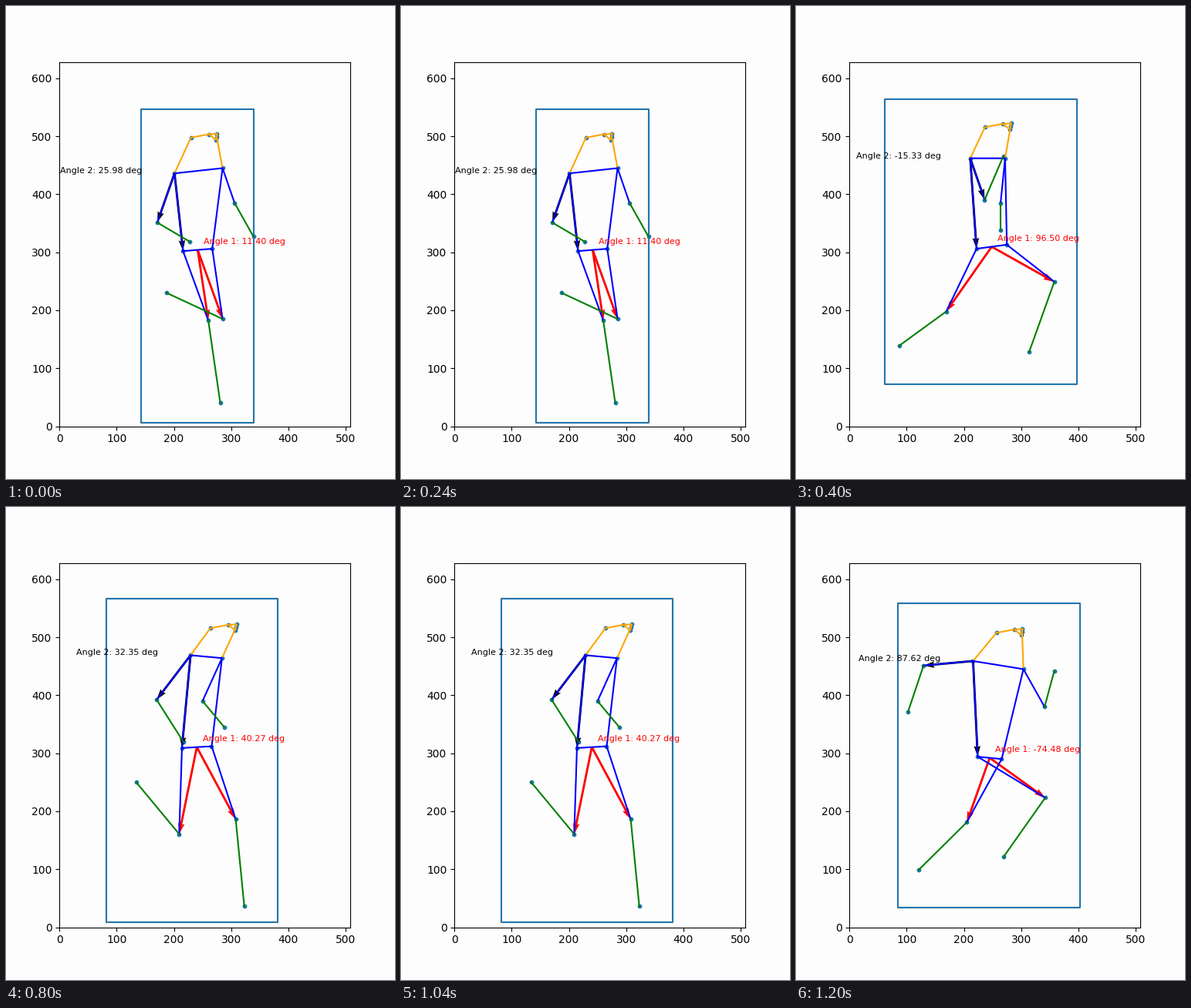
A matplotlib script that plays this animation: 504x614 px, repeating every 1600 ms.

```python
import matplotlib.pyplot as plt
import numpy as np
from matplotlib.animation import FuncAnimation

W, H, DPI = 504, 614, 100
LEFT, TOP, AX_W, AX_H = 69.4, 72.7, 377, 472.8
PAPER = "#fdfdfd"

# Key points per pose. The right elbow and right knee follow from the two
# labelled angles, the face from the nose.
POSES = [
    dict(leg_angle=11.40, thigh=123, arm_angle=25.98, arm=90, nose=(273, 494),
         left_arm=[(285, 445), (306, 385), (339, 327)],
         left_leg=[(267, 306), (285, 185), (187, 230)],
         shoulder=(201, 436), wrist=(228, 318), hip=(216, 302), ankle=(281, 40),
         box=(142, 340, 6, 547)),
    dict(leg_angle=96.50, thigh=137, arm_angle=-15.33, arm=76, nose=(280, 512),
         left_arm=[(272, 462), (264, 384), (264, 338)],
         left_leg=[(275, 313), (358, 249), (314, 128)],
         shoulder=(211, 462), wrist=(269, 466), hip=(222, 306), ankle=(87, 139),
         box=(61, 398, 72, 564)),
    dict(leg_angle=40.27, thigh=153, arm_angle=32.35, arm=97, nose=(307, 512),
         left_arm=[(284, 464), (250, 390), (288, 345)],
         left_leg=[(266, 312), (308, 186), (323, 36)],
         shoulder=(229, 469), wrist=(217, 319), hip=(214, 309), ankle=(134, 250),
         box=(82, 382, 8, 567)),
    dict(leg_angle=-74.48, thigh=119, arm_angle=87.62, arm=87, nose=(300, 504),
         left_arm=[(304, 445), (341, 380), (358, 442)],
         left_leg=[(266, 290), (205, 181), (121, 99)],
         shoulder=(216, 459), wrist=(102, 371), hip=(224, 294), ankle=(269, 121),
         box=(84, 403, 34, 559)),
]


def tilt(start, end):
    """Angle of a bone away from straight down, in degrees."""
    dx, dy = np.subtract(end, start)
    return np.degrees(np.arctan2(dx, -dy))


def reach(start, angle, length):
    a = np.radians(angle)
    return np.add(start, (length * np.sin(a), -length * np.cos(a)))


def draw_chain(ax, points, color):
    ax.plot(*np.transpose(points), color=color, lw=1.5)


def draw_arrows(ax, start, ends):
    step = np.subtract(ends, start)
    base = np.repeat([start], len(ends), axis=0)
    return ax.quiver(*base.T, *step.T, angles="xy", scale_units="xy",
                     scale=1, width=0.0075)


def draw_box(ax, x0, x1, y0, y1):
    corners = [(x0, y0), (x1, y0), (x1, y1), (x0, y1), (x0, y0)]
    ax.plot(*np.transpose(corners), color="C1", lw=1.5, solid_joinstyle="miter")
    for edge in zip(corners, corners[1:]):
        ax.plot(*np.transpose(edge), color="C0", lw=1.5, solid_capstyle="butt")


def draw(i):
    p = POSES[i]
    ax.clear()
    ax.set(xlim=(0, 508.8), ylim=(0, 628),
           xticks=range(0, 501, 100), yticks=range(0, 601, 100))

    shoulder, hip = p["shoulder"], p["hip"]
    l_shoulder, l_elbow, l_wrist = p["left_arm"]
    l_hip, l_knee, l_ankle = p["left_leg"]
    pelvis = np.add(hip, l_hip) / 2
    knee = reach(pelvis, tilt(pelvis, l_knee) - p["leg_angle"], p["thigh"])
    elbow = reach(shoulder, tilt(shoulder, hip) - p["arm_angle"], p["arm"])

    nose = np.array(p["nose"])
    l_eye, eye = nose + (2.4, 10.3), nose + (-12.1, 9.4)
    l_ear, ear = nose + (1.7, 5.4), nose + (-43.3, 3.6)

    draw_box(ax, *p["box"])
    joints = [nose, l_eye, eye, l_ear, ear, shoulder, elbow, p["wrist"],
              hip, knee, p["ankle"], *p["left_arm"], *p["left_leg"]]
    ax.scatter(*np.transpose(joints), s=10, color="C0")

    draw_chain(ax, [shoulder, ear, eye, l_eye, l_ear, l_shoulder], "orange")
    draw_chain(ax, [eye, nose, l_eye], "orange")
    draw_chain(ax, [elbow, shoulder, l_shoulder, l_elbow], "blue")
    draw_chain(ax, [shoulder, hip, l_hip, l_shoulder], "blue")
    for bone in ([hip, knee], [l_hip, l_knee]):
        draw_chain(ax, bone, "blue")
    for bone in ([elbow, p["wrist"]], [l_elbow, l_wrist],
                 [knee, p["ankle"]], [l_knee, l_ankle]):
        draw_chain(ax, bone, "green")

    draw_arrows(ax, pelvis, [l_knee, knee]).set_color("red")
    draw_arrows(ax, shoulder, [elbow, hip]).set_color("black")

    ax.text(*(pelvis + 10), f"Angle 1: {p['leg_angle']:.2f} deg",
            color="red", fontsize=8)
    ax.text(shoulder[0] - 200, shoulder[1], f"Angle 2: {p['arm_angle']:.2f} deg",
            color="black", fontsize=8)
    return []


plt.rcParams["font.family"] = "DejaVu Sans"
fig = plt.figure(figsize=(W / DPI, H / DPI), dpi=DPI, facecolor=PAPER)
ax = fig.add_axes([LEFT / W, 1 - (TOP + AX_H) / H, AX_W / W, AX_H / H],
                  facecolor=PAPER)

anim = FuncAnimation(fig, draw, frames=len(POSES), interval=400,
                     init_func=lambda: draw(0), repeat=True, repeat_delay=0)
plt.show()
```
